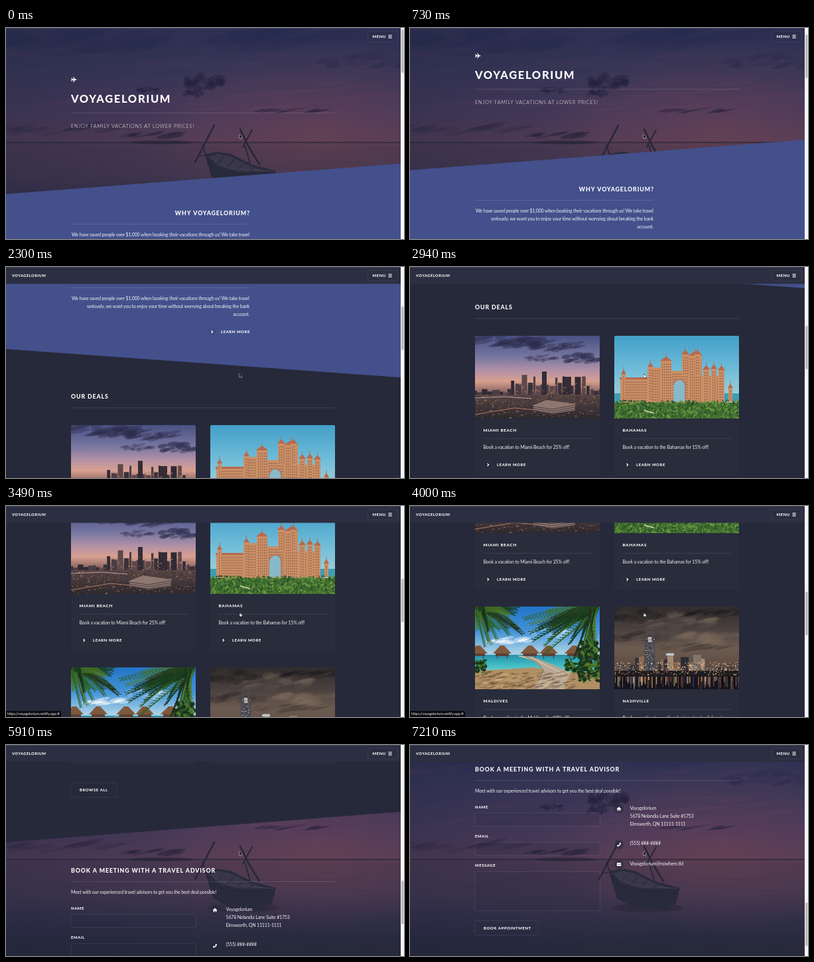
Write an HTML page with a canvas that moves like this. It is 600 by 319 pixels and loops after 7.24 s.

```html
<!DOCTYPE html>
<html lang="en">
<head>
<meta charset="utf-8">
<title>Voyagelorium</title>
<style>
html, body { margin: 0; width: 100%; height: 100%; overflow: hidden; background: #262939; }
canvas { display: block; width: 600px; height: 319px; }
</style>
</head>
<body>
<canvas id="stage"></canvas>
<script>
const W = 600, H = 319, PAGE_W = 595, LOOP = 7240;
const BRAND = 'Voyagelorium';
const HEAD = 'Lato, "Open Sans", sans-serif';
const BODY = 'Lato, "Noto Sans", sans-serif';
const BLUE = '#43508b', DARK = '#262939', BAR = '#2c2f42';
const LINE = 'rgba(255,255,255,.15)';

const dpr = Math.max(1, window.devicePixelRatio || 1);
const stage = document.getElementById('stage');
stage.width = W * dpr;
stage.height = H * dpr;
let c = stage.getContext('2d');

// Small drawing helpers
function seeded(seed) {
  return () => (seed = (seed * 16807) % 2147483647) / 2147483647;
}
function rect(x, y, w, h, fill) {
  c.fillStyle = fill;
  c.fillRect(x, y, w, h);
}
function trace(...p) {
  c.beginPath();
  for (let i = 0; i < p.length; i += 2) c.lineTo(p[i], p[i + 1]);
}
function poly(fill, ...p) {
  trace(...p);
  c.fillStyle = fill;
  c.fill();
}
function stroke(color, width, ...p) {
  trace(...p);
  c.strokeStyle = color;
  c.lineWidth = width;
  c.stroke();
}
function oval(x, y, rx, ry, fill, tilt = 0) {
  c.beginPath();
  c.ellipse(x, y, rx, ry, tilt, 0, 7);
  c.fillStyle = fill;
  c.fill();
}
function box(x, y, w, h, r, line, fill) {
  c.beginPath();
  c.roundRect(x, y, w, h, r);
  if (fill) { c.fillStyle = fill; c.fill(); }
  if (line) { c.strokeStyle = line; c.lineWidth = .7; c.stroke(); }
}
function fade(h, ...stops) {
  const g = c.createLinearGradient(0, 0, 0, h);
  for (let i = 0; i < stops.length; i += 2) g.addColorStop(stops[i], stops[i + 1]);
  return g;
}
function cloud(x, y, w, h, fill, seed, n = 22) {
  const r = seeded(seed);
  for (let i = 0; i < n; i++) {
    const u = r() * 2 - 1, v = (r() * 2 - 1) * (1 - Math.abs(u) * .6);
    oval(x + u * w, y + v * h, w * (.15 + r() * .2), h * (.2 + r() * .25), fill, -.2);
  }
}
function picture(w, h, draw) {
  const cv = document.createElement('canvas'), main = c;
  cv.width = w * dpr;
  cv.height = h * dpr;
  c = cv.getContext('2d');
  c.scale(dpr, dpr);
  draw(w, h);
  c = main;
  return cv;
}

// Text is placed by the middle of its capitals
function text(str, x, mid, size, o = {}) {
  c.font = `${o.weight || 400} ${size}px ${o.font || BODY}`;
  c.letterSpacing = (o.space || 0) + 'px';
  c.textAlign = 'left';
  c.fillStyle = o.color || '#fff';
  const w = o.right ? c.measureText(str).width - (o.space || 0) : 0;
  c.fillText(str, x - w, mid + size * .36);
}
function title(str, x, mid, size, o = {}) {
  text(str.toUpperCase(), x, mid, size, { weight: 800, font: HEAD, space: size * .1, ...o });
}
function para(str, x, mid, o = {}) {
  text(str, x, mid, 7, { space: -.17, color: 'rgba(255,255,255,.92)', ...o });
}
const rule = (x1, x2, y, color = LINE) => rect(x1, y, x2 - x1, .8, color);

// Sunset seascape that stays still behind the page
const sea = picture(PAGE_W, H, (w, h) => {
  rect(0, 0, w, h, fade(h, 0, '#2d3051', .2, '#363556', .4, '#45395a', .53, '#513c55',
    .56, '#473850', .7, '#41364e', .82, '#312f47', .92, '#282a3e', 1, DARK));
  const r = seeded(31);
  for (let i = 0; i < 60; i++) {
    oval(r() * w, 35 + r() * 95, 25 + r() * 55, 1 + r() * 3, `rgba(125,75,100,${.03 + r() * .05})`, -.08);
  }
  c.save();
  c.translate(470, 150);
  c.scale(1, .48);
  const glow = c.createRadialGradient(0, 0, 5, 0, 0, 270);
  glow.addColorStop(0, 'rgba(150,75,85,.27)');
  glow.addColorStop(1, 'rgba(150,75,85,0)');
  rect(-470, -315, w, 680, glow);
  c.restore();
  cloud(470, 14, 150, 22, 'rgba(36,42,78,.22)', 5);
  cloud(120, 20, 130, 20, 'rgba(36,42,78,.2)', 9);
  cloud(540, 52, 60, 12, 'rgba(40,40,75,.2)', 4);
  cloud(299, 82, 26, 13, 'rgba(37,36,62,.4)', 77, 34);
  cloud(283, 99, 14, 7, 'rgba(37,36,62,.4)', 15, 18);
  cloud(214, 95, 15, 6, 'rgba(37,36,62,.4)', 8, 22);
  cloud(430, 125, 48, 3, 'rgba(42,38,62,.35)', 12);
  cloud(70, 152, 90, 7, 'rgba(40,38,60,.2)', 21);
  cloud(225, 162, 40, 5, 'rgba(36,35,55,.35)', 41);
  rect(0, 172, w, 2.2, 'rgba(38,35,55,.6)');
  oval(235, 173, 48, 3, 'rgba(34,33,50,.55)');
  for (let i = 0; i < 130; i++) {
    const y = 178 + r() * 135;
    rect(r() * w, y, 20 + r() * 60, .8, i % 2 ? 'rgba(140,80,95,.05)' : 'rgba(25,25,50,.11)');
  }
  oval(358, 246, 54, 7, 'rgba(27,27,42,.3)');
  poly('#292a3c', 300, 191, 318, 187, 338, 190, 372, 207, 407, 216, 401, 239, 388, 250, 340, 247, 312, 232);
  poly('#393648', 307, 194, 319, 190, 338, 194, 371, 210, 396, 217, 350, 217, 318, 208);
  stroke('#242536', 1, 303, 206, 330, 219, 401, 224);
  stroke('#4a4153', .8, 302, 193, 334, 211, 404, 217);
  for (let i = 0; i < 4; i++) stroke('#2a2a3b', 1.2, 318 + i * 16, 207 + i * 3, 328 + i * 15, 194 + i * 6);
  c.lineCap = 'round';
  stroke('#272737', 2.6, 314, 147, 299, 176, 285, 203);
  stroke('#272737', 1.8, 296, 177, 305, 203);
  stroke('#272737', 2.6, 353, 153, 365, 178, 382, 206);
  stroke('#272737', 1.9, 371, 154, 357, 180);
  stroke('#272737', 1.8, 360, 177, 368, 205);
  stroke('#272737', 1, 290, 193, 302, 193);
  const side = c.createLinearGradient(0, 0, w, 0);
  side.addColorStop(0, 'rgba(32,36,62,.3)');
  side.addColorStop(.5, 'rgba(32,36,62,0)');
  rect(0, 0, w, h, side);
});

function lights(n, x, y, w, h, colors, seed) {
  const r = seeded(seed);
  for (let i = 0; i < n; i++) {
    rect(x + r() * w, y + r() * h, .7 + r() * 1.3, .7 + r() * .6, colors[i % colors.length]);
  }
}

const miami = picture(188, 125, (w, h) => {
  rect(0, 0, w, h, fade(h, 0, '#4a5184', .25, '#7576a0', .42, '#b291a6', .55, '#d8a08f', .68, '#8c6763', 1, '#302b30'));
  cloud(40, 9, 55, 11, 'rgba(45,46,75,.38)', 3, 30);
  cloud(120, 14, 35, 9, 'rgba(45,46,75,.4)', 17, 28);
  cloud(165, 35, 28, 9, 'rgba(50,50,80,.42)', 23, 28);
  cloud(100, 34, 22, 5, 'rgba(60,55,85,.35)', 11);
  const r = seeded(19);
  for (let x = 0; x < w;) {
    const bw = 3 + r() * 6, tall = x > 50 && x < 172;
    const bh = tall ? 13 + r() * 19 : 4 + r() * 6;
    rect(x, 90 - bh, bw, bh + 4, ['#4a3c45', '#3a3039', '#5e4748', '#302a35'][Math.floor(r() * 4)]);
    x += bw + (tall ? r() * 2 : 0);
  }
  rect(101, 54, 7, 36, '#332c36');
  rect(135, 62, 10, 28, '#342c36');
  lights(90, 50, 68, 125, 22, ['#b98361', '#6d555a', '#dba873'], 6);
  rect(0, 89, w, 36, fade(125, .7, '#5a4646', 1, '#2d292e'));
  lights(420, 0, 90, w, 34, ['#3c3237', '#8d5f4a', '#242329', '#c88b5c', '#785d57', '#32272c'], 8);
  poly('#8e7770', 88, 105, 108, 97, 151, 103, 150, 113, 116, 118, 88, 112);
  for (let i = 0; i < 3; i++) stroke('#4a3c40', 1, 88, 107 + i * 3, 116, 111 + i * 3, 150, 105 + i * 3);
  stroke('#b57b5c', 1, 0, 119, 60, 109, 90, 112);
  stroke('#b7a0a0', 1, 0, 94, 45, 92, 85, 95);
});

const bahamas = picture(188, 125, (w, h) => {
  rect(0, 0, w, h, fade(h, 0, '#429fc9', .45, '#74bfd9', .8, '#a5d2d9', 1, '#a5d2d9'));
  const wall = '#c98f65', shade = '#9a6350', roof = '#b8684c';
  rect(0, 87, w, 13, '#3d9db2');
  const block = (x, y, bw, bh) => {
    rect(x, y, bw, bh, wall);
    for (let j = y + 4; j < y + bh - 1; j += 4)
      for (let i = x + 2; i < x + bw - 1; i += 3) rect(i, j, 1.3, 2, shade);
  };
  const tower = (x, y, tw, bottom) => {
    block(x, y, tw, bottom - y);
    poly(roof, x - 1, y, x + tw / 2, y - 7, x + tw + 1, y);
    stroke(roof, .8, x + tw / 2, y - 5, x + tw / 2, y - 11);
  };
  block(9, 65, 64, 36);
  rect(8, 63, 66, 3, roof);
  tower(11, 58, 6, 100);
  block(50, 48, 25, 52);
  tower(51, 47, 7, 100);
  tower(70, 38, 16, 102);
  block(86, 53, 32, 49);
  tower(102, 28, 10, 60);
  tower(112, 30, 20, 102);
  tower(121, 28, 9, 60);
  block(132, 60, 34, 42);
  tower(134, 51, 9, 100);
  tower(146, 50, 8, 100);
  tower(157, 52, 9, 100);
  tower(172, 79, 6, 100);
  c.beginPath();
  c.arc(98, 75, 9, Math.PI, 0);
  c.lineTo(107, 101);
  c.lineTo(89, 101);
  c.fillStyle = '#88b9c9';
  c.fill();
  c.strokeStyle = '#b76e51';
  c.lineWidth = 1.5;
  c.stroke();
  rect(0, 101, w, 24, '#416f30');
  const r = seeded(44), greens = ['#2d5d2b', '#4f8637', '#719a3e', '#355e2f', '#6c8d45', '#28502a'];
  for (let i = 0; i < 520; i++) oval(r() * w, 98 + r() * 28, 1 + r() * 2, .6 + r(), greens[i % 6], r() * 3);
  stroke('#d8d9c1', 1.4, 45, 113, 60, 117);
});

function frond(x, y, angle, len, color) {
  const dx = Math.cos(angle), dy = Math.sin(angle);
  for (let i = 0; i < 20; i++) {
    const u = i / 19, px = x + dx * len * u, py = y + dy * len * u + u * u * 9, s = (1 - u * .65) * 12;
    stroke(color, 1.1, px, py, px + dx * 5 - dy * 3, py + s);
    stroke(color, 1, px, py, px + dx * 8, py + dy * 5 - s * .4);
  }
}

const maldives = picture(188, 125, (w, h) => {
  rect(0, 0, w, h, fade(h, 0, '#2374c7', .3, '#4393d8', .55, '#a6cfe4', 1, '#b4d6e6'));
  cloud(55, 51, 30, 5, 'rgba(255,255,255,.4)', 13);
  cloud(115, 40, 28, 10, 'rgba(255,255,255,.15)', 3);
  rect(0, 73, w, 28, fade(125, .58, '#268da8', .7, '#3fbac2', .82, '#83d0c8'));
  for (const [x, s] of [[5, 1], [41, 1], [83, 1.05], [111, 1], [150, 1.1]]) {
    rect(x - 10 * s, 70, 20 * s, 5, '#5a4137');
    poly('#80583c', x - 14 * s, 71, x - 3, 59, x + 3, 59, x + 14 * s, 71);
    rect(x - 8, 74, 1, 5, '#514038');
    rect(x + 7, 74, 1, 5, '#514038');
  }
  poly('#b08f63', 0, 97, 45, 95, 88, 92, 130, 100, 188, 98, 188, 125, 0, 125);
  poly('#b9a894', 64, 74, 87, 76, 117, 88, 144, 100, 133, 125, 88, 125, 104, 96, 89, 83);
  stroke('#e0d2bc', 1, 66, 75, 87, 79, 112, 91, 138, 104);
  stroke('#6e6961', 1, 77, 76, 93, 84, 103, 96, 93, 119);
  const r = seeded(14), g = ['#1b3f1f', '#2d6126', '#4f7a2a', '#16331e', '#23301a'];
  for (let i = 0; i < 200; i++) {
    oval(r() * 150, 99 + r() * 26, 2 + r() * 7, .5 + r() * .8, i % 3 ? 'rgba(80,60,42,.35)' : 'rgba(225,195,145,.35)', -.2);
  }
  stroke('#3d3026', 4, 172, 110, 167, 70, 184, 0);
  for (let i = 0; i < 24; i++) frond(r() * 22 - 6, r() * 10 - 8, r() * 1.7, 26 + r() * 36, g[i % 5]);
  for (let i = 0; i < 40; i++) frond(174 + r() * 14, r() * 12 - 6, 1.3 + r() * 1.9, 40 + r() * 58, g[i % 5]);
  for (let i = 0; i < 170; i++) oval(155 + r() * 33, 52 + r() * 60, 2 + r() * 3, 1 + r() * 2, g[i % 5], r() * 3);
  for (let i = 0; i < 45; i++) oval(r() * 16, 80 + r() * 20, 1.5 + r() * 2, 1 + r() * 2, g[i % 5]);
  for (let i = 0; i < 40; i++) oval(137 + r() * 14, 80 + r() * 18, 1.5 + r() * 2, 1 + r() * 2, g[i % 5]);
});

const nashville = picture(188, 125, (w, h) => {
  rect(0, 0, w, h, fade(h, 0, '#322c2d', .25, '#483f3d', .5, '#6b5b50', .72, '#604d45', 1, '#181820'));
  cloud(95, 22, 55, 12, 'rgba(135,115,98,.13)', 6, 30);
  cloud(150, 45, 50, 11, 'rgba(150,125,105,.13)', 27, 30);
  cloud(20, 14, 45, 13, 'rgba(30,28,32,.2)', 22, 30);
  cloud(150, 10, 45, 8, 'rgba(25,24,29,.22)', 31);
  cloud(35, 48, 45, 9, 'rgba(40,36,38,.18)', 45);
  cloud(120, 62, 50, 5, 'rgba(45,38,40,.16)', 61);
  const r = seeded(52);
  for (let x = 0; x < w;) {
    const bw = 4 + r() * 8, bh = x > 28 && x < 135 ? 9 + r() * 16 : 5 + r() * 6;
    rect(x, 99 - bh, bw, bh, ['#2c2c35', '#5c5050', '#8a6a54', '#34313a', '#a58c76'][Math.floor(r() * 5)]);
    x += bw;
  }
  poly('#4a4a52', 45, 98, 46, 55, 48, 40, 50, 28, 51, 46, 56, 46, 57, 28, 59, 40, 61, 55, 62, 98);
  rect(51, 46, 5, 8, '#c4bdb5');
  lights(70, 47, 48, 13, 48, ['#e6d2ad', '#858793', '#212630'], 19);
  rect(80, 70, 9, 28, '#a08a70');
  rect(119, 73, 12, 25, '#827469');
  rect(78, 71, 12, 3, '#b8cada');
  lights(420, 0, 84, w, 14, ['#ffe1a0', '#d9863f', '#484044', '#fff3d0', '#25252d', '#6b4a3a'], 24);
  rect(0, 97, w, 10, '#1d1b20');
  lights(200, 0, 96, w, 7, ['#24232a', '#ce8c4c', '#343039', '#ffd59a'], 28);
  rect(0, 106, w, 19, '#14151e');
  for (let i = 0; i < 120; i++) {
    rect(r() * w, 106, .6 + r() * 1.6, 5 + r() * 14,
      ['rgba(235,173,91,.55)', 'rgba(255,226,170,.55)', 'rgba(75,77,120,.5)', 'rgba(170,82,54,.5)', 'rgba(15,15,22,.7)'][i % 5]);
  }
});

// Icons
function plane(x, y) {
  poly('#fff', x - 4, y - 2.6, x - 3, y - 2.6, x - 1.9, y - .8, x, y - .8, x - 1.2, y - 3.8, x, y - 3.8, x + 1.9, y - .8,
    x + 3.6, y - .7, x + 4.3, y, x + 3.6, y + .7, x + 1.9, y + .8, x, y + 3.8, x - 1.2, y + 3.8, x, y + .8,
    x - 1.9, y + .8, x - 3, y + 2.6, x - 4, y + 2.6, x - 3.4, y);
}
function more(x, y, gap = 13.5) {
  box(x - 6.8, y - 6.8, 13.6, 13.6, 6.8, 'rgba(255,255,255,.08)', 'rgba(20,22,35,.08)');
  stroke('#fff', 1.2, x - .9, y - 2, x + 1.1, y, x - .9, y + 2);
  title('Learn more', x + gap, y, 5.9);
}
function badge(y, draw) {
  oval(315, y, 7, 7, 'rgba(38,41,57,.55)');
  c.save();
  c.translate(315, y);
  draw();
  c.restore();
}
function house() {
  poly('#fff', -3.6, .2, 0, -3, 3.6, .2, 2.4, .2, 2.4, 2.9, .7, 2.9, .7, .9, -.7, .9, -.7, 2.9, -2.4, 2.9, -2.4, .2);
}
function phone() {
  c.beginPath();
  c.moveTo(2, -2.3);
  c.quadraticCurveTo(1.8, 1.8, -2.3, 2);
  c.strokeStyle = '#fff';
  c.lineWidth = 1.5;
  c.stroke();
  oval(1.7, -1.8, 1.2, 1, '#fff');
  oval(-1.8, 1.7, 1, 1.2, '#fff');
}
function envelope() {
  box(-3.2, -2.4, 6.4, 4.8, .6, null, '#fff');
  stroke('#34364a', .6, -3.2, -1.2, 0, .9, 3.2, -1.2);
}

function card(x, y, h, img, name, lines) {
  box(x, y, 188, h, 2, null, 'rgba(255,255,255,.01)');
  c.save();
  c.beginPath();
  c.roundRect(x, y, 188, 125, [2, 2, 0, 0]);
  c.clip();
  c.drawImage(img, x, y, 188, 125);
  c.restore();
  title(name, x + 12.5, y + 142.5, 6.4);
  rule(x + 12.5, x + 176, y + 155, 'rgba(255,255,255,.11)');
  lines.forEach((s, i) => para(s, x + 12.5, y + 168 + i * 12));
  more(x + 19.5, y + 195 + (lines.length - 1) * 12);
}
function field(name, y, h) {
  title(name, 98, y, 5.9);
  box(98, y + 9.5, 188.5, h, 2, 'rgba(255,255,255,.12)', 'rgba(38,41,62,.18)');
}
function button(str, y, w) {
  box(98, y, w, 22, 2, 'rgba(255,255,255,.1)');
  title(str, 111, y + 11, 5.9);
}

function page() {
  plane(102.3, 78);
  title(BRAND, 98, 107, 16.5);
  rule(98, 496, 128);
  title('Enjoy family vacations at lower prices!', 98, 148.3, 7.4, { weight: 300, space: .72 });

  poly(BLUE, 0, 251, PAGE_W, 205, PAGE_W, 440, 0, 394);
  poly(DARK, 0, 389, PAGE_W, 432, PAGE_W, 1036, 0, 1082);
  title('Why ' + BRAND + '?', 367, 280, 8.8, { right: true });
  rule(98, 367, 296);
  ['We have saved people over $1,000 when booking their vacations through us! We take travel',
   'seriously, we want you to enjoy your time without worrying about breaking the bank',
   'account.'].forEach((s, i) => para(s, 367, 312 + i * 12, { right: true }));
  more(310.5, 363);

  title('Our deals', 98, 461.3, 8.8);
  rule(98, 496, 477.5);
  card(98, 504, 211, miami, 'Miami Beach', ['Book a vacation to Miami Beach for 25% off!']);
  card(308, 504, 211, bahamas, 'Bahamas', ['Book a vacation to the Bahamas for 15% off!']);
  card(98, 740, 226, maldives, 'Maldives', ['Book a vacation to the Maldives for 10% off!']);
  card(308, 740, 226, nashville, 'Nashville', ['Book a vacation to see the glowing streets of downtown', 'Nashville for 30% off']);
  button('Browse all', 992, 69);

  title('Book a meeting with a travel advisor', 98, 1125, 8.8);
  rule(98, 496, 1141);
  para('Meet with our experienced travel advisors to get you the best deal possible!', 98, 1157);
  field('Name', 1181.5, 19.5);
  field('Email', 1225.8, 19.5);
  field('Message', 1270, 59);
  button('Book appointment', 1353.5, 95);
  badge(1184.5, house);
  badge(1238.5, phone);
  badge(1268.5, envelope);
  [BRAND, '5678 Nolandia Lane Suite #1753', 'Elmsworth, QN 11111-1111']
    .forEach((s, i) => para(s, 331.5, 1183 + i * 12));
  para('(555) ###-####', 331.5, 1236.5);
  para(BRAND + '@nowhere.tld', 331.5, 1267);
}

// Scroll position: smooth curve through a few keys
const keys = [[0, 0], [1420, 107], [2940, 400], [4000, 588], [4760, 751], [5910, 935], [7210, 1088]];
const pace = keys.slice(1).map((k, i) => (k[1] - keys[i][1]) / (k[0] - keys[i][0]));
const slope = keys.map((k, i) => {
  if (!i) return 0;
  if (i === pace.length) return .08;
  return 2 * pace[i - 1] * pace[i] / (pace[i - 1] + pace[i]);
});
function scrollAt(t) {
  if (t >= 7210) return 1088;
  const i = keys.findIndex(k => k[0] > t) - 1;
  const [t0, y0] = keys[i], [t1, y1] = keys[i + 1];
  const d = t1 - t0, u = (t - t0) / d, v = 1 - u;
  return y0 * v * v * (1 + 2 * u) + y1 * u * u * (3 - 2 * u) + d * u * v * (slope[i] * v - slope[i + 1] * u);
}

function chrome(t, y) {
  const show = Math.min(1, Math.max(0, (y - 227) / 30));
  if (show) {
    c.globalAlpha = show;
    rect(0, 0, PAGE_W, 25.5, BAR);
    title(BRAND, 9, 13, 5.6);
    c.globalAlpha = 1;
  }
  box(545.5, 5, 45, 16, 2, 'rgba(255,255,255,.11)', 'rgba(38,41,57,.15)');
  title('Menu', 552.5, 13, 5.9);
  for (let i = 0; i < 3; i++) rect(576.5, 10.4 + i * 2.1, 5.2, 1, '#fff');
  rect(0, 0, W, .7, 'rgba(90,92,105,.7)');

  rect(PAGE_W, 0, 5, H, '#f7f7f7');
  box(596, 2 + y * .217, 3.4, 66, 1.7, null, '#b9b9b9');

  if (t > 3000 && t < 5000) {
    box(-2, 310, 85, 11, 2, null, '#08090c');
    text('https://' + BRAND.toLowerCase() + '.netlify.app/#', 2, 314.3, 5.3, { color: '#f4f4f6' });
  }
  c.save();
  c.translate(352, 161);
  c.lineJoin = 'round';
  if (t > 2800 && t < 4950) {
    trace(0, 3, .8, 2.7, .8, .8, 1.6, .8, 1.6, 2.5, 3.7, 3, 3.6, 4.8, 3.1, 6, 1.3, 6, -.1, 4);
    c.fillStyle = '#fff';
    c.strokeStyle = '#111';
  } else {
    trace(0, 0, 0, 5.6, 1.3, 4.5, 2.2, 6.5, 3.1, 6.1, 2.3, 4.2, 4, 4.1, 0, 0);
    c.fillStyle = '#0b0b0d';
    c.strokeStyle = '#e8e8ec';
  }
  c.lineWidth = 1;
  c.stroke();
  c.fill();
  c.restore();
}

let start;
function frame(now) {
  if (start === undefined) start = now;
  const t = (now - start) % LOOP, y = Math.round(scrollAt(t));
  c.setTransform(dpr, 0, 0, dpr, 0, 0);
  c.drawImage(sea, 0, 0, PAGE_W, H);
  c.save();
  c.translate(0, -y);
  page();
  c.restore();
  chrome(t, y);
  requestAnimationFrame(frame);
}
requestAnimationFrame(frame);
</script>
</body>
</html>
```
